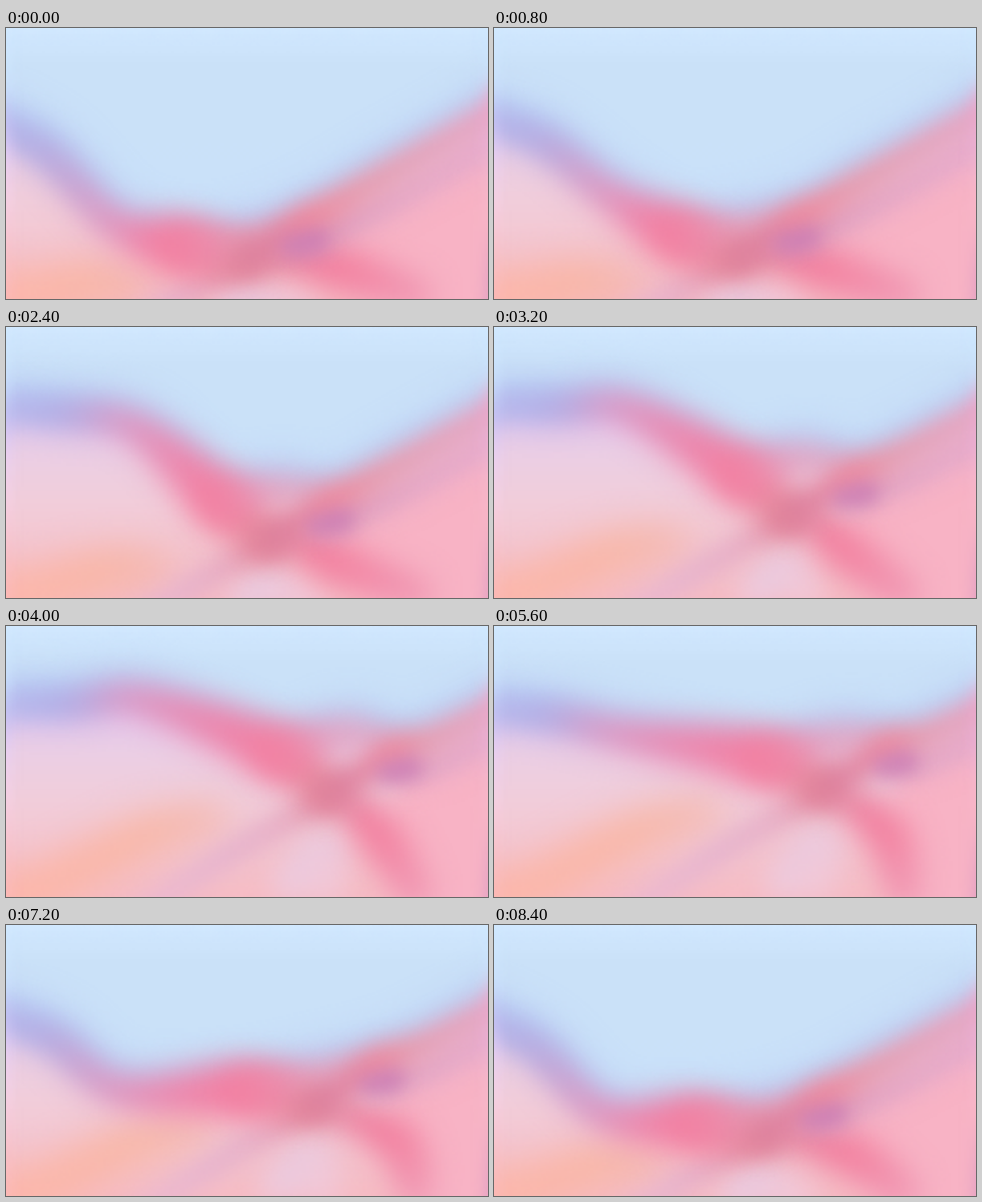
Recreate the animation shown at these times as an HTML page with a canvas. Size 600 by 338 pixels, loop 8.6 s.

```html
<!DOCTYPE html>
<html lang="en">
<head>
<meta charset="utf-8">
<title>Flowing gradient</title>
<style>
  html, body { margin: 0; width: 100%; height: 100%; overflow: hidden; background: #cbe2fa; }
  canvas { display: block; width: 600px; height: 338px; }
</style>
</head>
<body>
<canvas id="view" width="300" height="169"></canvas>
<script>
const LOOP = 8600, STEP = 200, SCALE = 0.5, MARGIN = 60;
const out = document.getElementById('view').getContext('2d');
// The sheet is wider than the view so that blurs do not fade at its rim.
const sheet = document.createElement('canvas');
sheet.width = 360;
sheet.height = 229;
const g = sheet.getContext('2d');

// Two slow swings drive every moving point.
const KEYS = [0, 1600, 2400, 4000, 5600, 7200, 8400];
const LEFT = [0, 0.55, 0.8, 1, 0.7, 0.22, 0.04];
const RIGHT = [0, 0.1, 0.25, 0.92, 1, 0.75, 0.3];

function swing(values, t) {
  const last = KEYS.length - 1;
  const slope = k => {
    const a = Math.max(k - 1, 0), b = Math.min(k + 1, last);
    const s = (values[b] - values[a]) / (KEYS[b] - KEYS[a]);
    return k === 0 || k === last ? s / 2 : s;
  };
  let i = 0;
  while (i < last - 1 && t >= KEYS[i + 1]) i++;
  const span = KEYS[i + 1] - KEYS[i], u = (t - KEYS[i]) / span;
  const v = 1 - u;
  return v * v * (1 + 2 * u) * values[i] + u * u * (3 - 2 * u) * values[i + 1]
    + span * u * v * (v * slope(i) - u * slope(i + 1));
}

const rgb = hex => [1, 3, 5].map(i => parseInt(hex.slice(i, i + 2), 16));

function catmull(a, b, c, d, u) {
  const cubic = 3 * (b - c) + d - a;
  const square = 2 * a - 5 * b + 4 * c - d;
  return b + 0.5 * u * (c - a + u * (square + u * cubic));
}

// Smooth samples through rows of equal length.
function curve(rows, n = 18) {
  const at = i => rows[Math.max(0, Math.min(rows.length - 1, i))];
  const res = [];
  for (let i = 0; i < rows.length - 1; i++) {
    const [a, b, c, d] = [at(i - 1), at(i), at(i + 1), at(i + 2)];
    for (let k = 0; k <= n; k++) {
      res.push(b.map((_, j) => catmull(a[j], b[j], c[j], d[j], k / n)));
    }
  }
  return res;
}

// Draws on the sheet, then lays it over the view with a soft blur.
function layer(blur, alpha, paint) {
  g.setTransform(1, 0, 0, 1, 0, 0);
  g.clearRect(0, 0, sheet.width, sheet.height);
  g.setTransform(SCALE, 0, 0, SCALE, MARGIN * SCALE, MARGIN * SCALE);
  paint();
  out.filter = `blur(${blur * SCALE}px)`;
  out.globalAlpha = alpha;
  out.drawImage(sheet, -MARGIN * SCALE, -MARGIN * SCALE);
  out.filter = 'none';
  out.globalAlpha = 1;
}

// stops: [point, radius, colour]
function band(blur, alpha, ...stops) {
  layer(blur, alpha, () => {
    for (const [x, y, r, ...c] of curve(stops.map(([p, r, c]) => [...p, r, ...rgb(c)]))) {
      g.fillStyle = `rgb(${c.map(Math.round)})`;
      g.beginPath();
      g.arc(x, y, Math.max(r, 1), 0, 7);
      g.fill();
    }
  });
}

function area(blur, alpha, fill, edge, ...corners) {
  layer(blur, alpha, () => {
    g.fillStyle = fill;
    g.beginPath();
    for (const [x, y] of [...curve(edge), ...corners]) g.lineTo(x, y);
    g.fill();
  });
}

function vertical(ctx, ...stops) {
  const grad = ctx.createLinearGradient(0, 0, 0, 338);
  for (const [y, c] of stops) grad.addColorStop(y / 338, c);
  return grad;
}

function draw(t) {
  const l = swing(LEFT, t), r = swing(RIGHT, t);
  const p = (x, y, lx = 0, ly = 0, rx = 0, ry = 0) =>
    [x + l * lx + r * rx, y + l * ly + r * ry];

  const start = p(-70, 100);
  const violet = p(40, 150, 40, -52);
  const rose = p(135, 245, 35, -145, 0, -8);
  const hot = p(220, 272, 30, -45, 95, -75);
  const crest = p(300, 265, 10, -50, 125, -90);
  const node = p(300, 288, 0, 0, 110, -85);
  const arm = p(385, 234, 0, 0, 115, -88);
  const armMid = p(480, 178, 0, 0, 65, -45);
  const armEnd = p(650, 82);
  const spot = p(368, 268, 0, 0, 130, -97);
  const under = p(480, 215, 0, 0, 62, -48);
  const underEnd = p(650, 118);
  const leg = p(420, 302, -50, 0, 105, -40);
  const foot = p(510, 332);
  const edge = [start, violet, rose, hot, crest, arm, armMid, armEnd];

  out.setTransform(SCALE, 0, 0, SCALE, 0, 0);
  out.fillStyle = vertical(out, [0, '#d1e8ff'], [50, '#cae1f8'], [170, '#cae1f9'], [338, '#cbe1fa']);
  out.fillRect(0, 0, 600, 338);
  out.setTransform(1, 0, 0, 1, 0, 0);

  // Periwinkle glow and the body below the ridge.
  band(20, 0.75, ...edge.map(q => [q, 34, '#b7c8f5']));
  area(16, 1, vertical(g, [90, '#e2c8f2'], [170, '#eccfe2'], [230, '#f2ccd8'], [338, '#f6bcc4']),
    edge, [670, 410], [-70, 410]);

  // Peach sweep, right-hand pink, pale wedge.
  band(22, 0.9, [p(-50, 345), 34, '#fdb6ac'], [p(35, 330), 28, '#fdb6a6'],
    [p(110, 318, 0, 0, 70, -62), 24, '#fab5a0'], [p(165, 322, 0, 0, 105, -92), 14, '#f6b4a4']);
  area(18, 1, '#f8b3c5', [spot, under, underEnd], [670, 410], [510, 410], leg);
  band(16, 0.9, [p(275, 345, 0, 0, 85, -25), 22, '#f0cbdd'],
    [p(305, 340, 0, 0, 100, -66), 24, '#e8cbe2'], [p(370, 350, 0, 0, 30, -30), 22, '#f1c9da']);
  band(14, 0.8, [p(165, 360), 12, '#e9bbd8'], [p(215, 338, 0, 0, 65, -56), 13, '#e2afd0'],
    [p(258, 312, 0, 0, 112, -82), 15, '#e4a2bc'], [node, 16, '#e48ca4']);

  // Lower right leg.
  band(18, 0.95, [node, 15, '#e2849e'], [p(355, 287, -10, 0, 95, -67), 18, '#e8809e'],
    [leg, 27, '#f37d9d'], [foot, 19, '#f092ae']);

  // Left ridge running into the crossing.
  band(18, 0.9, [start, 14, '#b8b6ee'], [violet, 19, '#a9a5e2'], [rose, 20, '#dd8cba'],
    [hot, 35, '#f57c9f'], [node, 20, '#e5869b']);
  band(18, 0.8, [hot, 28, '#f57c9f'], [crest, 17, '#e996b5'], [arm, 12, '#e68ea8']);

  // Right arm: mauve underside, salmon top.
  band(16, 0.85, [spot, 16, '#c987ba'], [under, 16, '#dd9dc3'], [underEnd, 18, '#e6a6cc']);
  band(15, 0.95, [node, 18, '#dd8099'], [p(342, 262, 0, 0, 112, -87), 17, '#df809f'],
    [arm, 18, '#f08699'], [armMid, 16, '#e997aa'], [armEnd, 17, '#eca0bf']);
  band(11, 0.75, [p(352, 272, 0, 0, 130, -97), 11, '#c47fbd'],
    [p(388, 264, 0, 0, 126, -95), 14, '#c87bb6']);

  // Soft pale rim.
  const rim = (x, ...stops) => band(9, 0.8, ...stops.map(([y, c]) => [p(x, y), 17, c]));
  rim(-13, [-50, '#d2e9ff'], [75, '#cee5ff'], [122, '#c9c7f7'], [172, '#ead2f9'],
    [240, '#fad0e4'], [295, '#fcc1c8'], [400, '#fcb4b4']);
  rim(614, [-50, '#d2e9ff'], [62, '#cee3fd'], [102, '#edaacd'], [150, '#ecb2d6'],
    [240, '#f8b8ca'], [320, '#e0a0c4'], [400, '#d898c0']);
  band(9, 0.7, [p(-50, -13), 17, '#d4ebff'], [p(650, -13), 17, '#d4ebff']);
}

let shown = -1;
const begin = performance.now();
function frame() {
  const t = Math.floor(((performance.now() - begin) % LOOP) / STEP) * STEP;
  if (t !== shown) draw(shown = t);
  requestAnimationFrame(frame);
}
frame();
</script>
</body>
</html>
```
